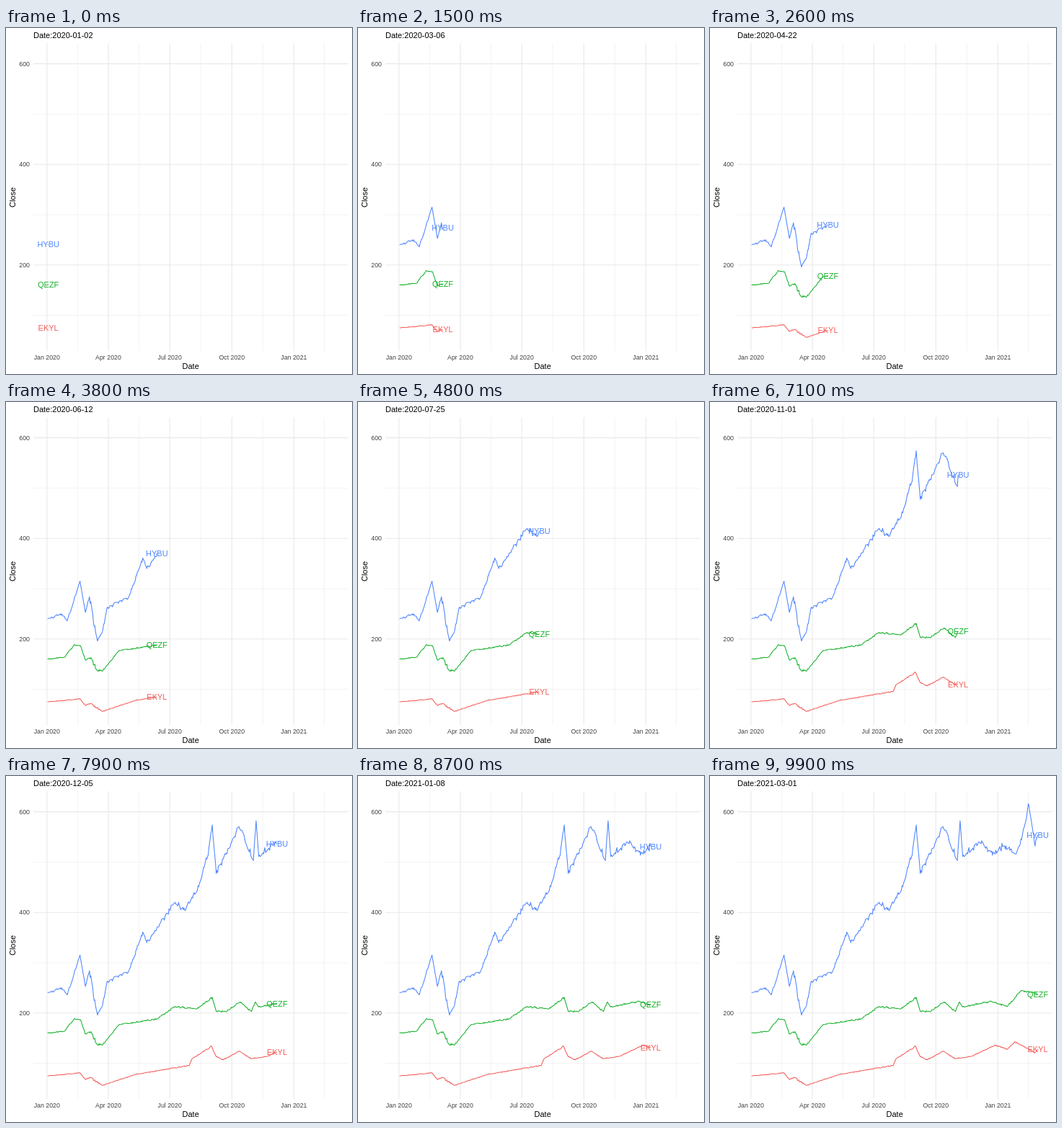
Write an HTML page that moves like this. It is 480x480 px and loops after 10 s.

```html
<!DOCTYPE html>
<html lang="en">
<head>
<meta charset="utf-8">
<title>Closing prices</title>
<style>
  html, body { margin: 0; width: 100%; height: 100%; overflow: hidden; background: #fff; }
  svg { display: block; width: 100vw; height: 100vh; }
  text { font: 11px "Liberation Sans", Arial, sans-serif; fill: #000; }
  .tick { font-size: 8.8px; fill: #404040; }
  .grid { stroke: #e8e8e8; stroke-width: 1.07; }
  .minor { stroke-width: .53; }
  .price { fill: none; stroke-width: 1.07; stroke-linejoin: round; }
</style>
</head>
<body>
<svg id="chart" viewBox="0 0 480 480"></svg>
<script>
const LOOP = 10000, STEP = 100, STEPS = LOOP / STEP;
const FIRST = 1, SPAN = 424, DAYS_PER_STEP = SPAN / (STEPS - 1);

// Turning points as [days since 1 January 2020, close].
const SERIES = [
  {
    name: 'EKYL', color: '#f35e5a', noise: .011,
    turns: [[1, 75], [49, 81], [57, 68], [65, 72], [82, 56], [131, 78], [163, 85],
      [211, 96], [215, 109], [244, 134], [251, 113], [261, 107], [285, 124], [303, 109],
      [327, 114], [362, 136], [380, 128], [391, 143], [421, 121], [425, 128]]
  },
  {
    name: 'QEZF', color: '#17b12b', noise: .01,
    turns: [[1, 160], [26, 164], [40, 188], [50, 186], [57, 158], [65, 163], [75, 137],
      [82, 136], [107, 177], [163, 188], [190, 213], [222, 208], [245, 231], [251, 203],
      [266, 203], [286, 222], [303, 203], [309, 222], [314, 212], [356, 223], [380, 213],
      [399, 243], [415, 242], [425, 237]]
  },
  {
    name: 'HYBU', color: '#5086ff', noise: .016,
    turns: [[1, 240], [22, 250], [30, 236], [49, 315], [57, 253], [63, 284], [75, 196],
      [82, 213], [89, 262], [121, 283], [142, 361], [148, 340], [190, 420], [204, 405],
      [223, 445], [238, 511], [245, 574], [251, 477], [274, 540], [285, 570], [306, 503],
      [310, 582], [314, 511], [338, 540], [362, 516], [373, 531], [394, 520], [401, 544],
      [412, 613], [421, 532], [425, 554]]
  }
];

const chart = document.getElementById('chart');
const px = day => 56.8 + day * .936;
const py = close => 468.4 - close * .698;

function add(tag, attrs, text = '') {
  const el = document.createElementNS('http://www.w3.org/2000/svg', tag);
  for (const key in attrs) el.setAttribute(key, attrs[key]);
  el.textContent = text;
  return chart.appendChild(el);
}

const dateOf = day => new Date(Date.UTC(2020, 0, 1 + day));
const quarterStart = q => (Date.UTC(2020, q * 3, 1) - Date.UTC(2020, 0, 1)) / 864e5;

const rule = (x1, y1, x2, y2, minor) =>
  add('line', { x1, y1, x2, y2, class: minor ? 'grid minor' : 'grid' });
const across = (close, minor) => rule(37.9, py(close), 474.5, py(close), minor);
const down = (day, minor) => rule(px(day), 21.3, px(day), 448.2, minor);

function drawAxes() {
  for (let v = 100; v <= 500; v += 200) across(v, true);
  for (let q = 0; q < 5; q++) down((quarterStart(q) + quarterStart(q + 1)) / 2, true);
  for (let v = 200; v <= 600; v += 200) {
    across(v);
    add('text', { x: 33, y: py(v) + 3.2, class: 'tick', 'text-anchor': 'end' }, v);
  }
  for (let q = 0; q < 5; q++) {
    const day = quarterStart(q);
    const label = dateOf(day).toLocaleDateString('en-US',
      { month: 'short', year: 'numeric', timeZone: 'UTC' });
    down(day);
    add('text', { x: px(day), y: 460, class: 'tick', 'text-anchor': 'middle' }, label);
  }
  add('text', { x: 256.2, y: 473, 'text-anchor': 'middle' }, 'Date');
  add('text', { transform: 'translate(13 235) rotate(-90)', 'text-anchor': 'middle' }, 'Close');
}

const isOpen = day => dateOf(day).getUTCDay() % 6 !== 0;

// Seeded value from -1 to 1.
function wobble(n) {
  const r = Math.sin(n * 127.1) * 43758.5453;
  return (r - Math.floor(r)) * 2 - 1;
}

// Daily swings are partly shared by all series and widest in the March crash.
function swing(day, seed) {
  const crash = 1 + 3 * Math.exp(-(((day - 72) / 8) ** 2));
  return crash * (.6 * wobble(day) + .4 * wobble(day + seed));
}

// One point per trading day, exact at the turning points.
function buildPoints({ turns, noise }, seed) {
  const points = [];
  let k = 0;
  for (let day = FIRST; day <= FIRST + SPAN; day++) {
    if (k < turns.length - 2 && turns[k + 1][0] <= day) k++;
    if (!isOpen(day)) continue;
    const [d0, c0] = turns[k], [d1, c1] = turns[k + 1];
    const base = c0 + (c1 - c0) * (day - d0) / (d1 - d0);
    const exact = day === d0 || day === d1;
    const close = exact ? base : base * (1 + noise * swing(day, seed));
    points.push({ day, x: px(day), y: py(close) });
  }
  return points;
}

drawAxes();
const title = add('text', { x: 38, y: 14 });
SERIES.forEach((s, i) => {
  s.points = buildPoints(s, 500 * (i + 1));
  s.line = add('polyline', { class: 'price', stroke: s.color });
});
for (const s of SERIES) {
  s.label = add('text', { 'text-anchor': 'middle', style: `fill:${s.color}` }, s.name);
}

function draw(step) {
  const day = FIRST + Math.floor(step * SPAN / (STEPS - 1));
  title.textContent = 'Date:' + dateOf(day).toISOString().slice(0, 10);
  // Each step reveals the trading days that round to it.
  const limit = FIRST + (step + .5) * DAYS_PER_STEP;
  for (const s of SERIES) {
    const shown = s.points.filter(p => p.day <= limit);
    const tip = shown[shown.length - 1];
    s.line.setAttribute('points', shown.map(p => `${p.x.toFixed(2)},${p.y.toFixed(2)}`).join(' '));
    s.label.setAttribute('x', tip.x);
    s.label.setAttribute('y', tip.y + 4.2);
  }
}

const start = performance.now();
let last = 0;
function tick() {
  const step = Math.floor((performance.now() - start) % LOOP / STEP);
  if (step !== last) draw(last = step);
  requestAnimationFrame(tick);
}
draw(0);
tick();
</script>
</body>
</html>
```
